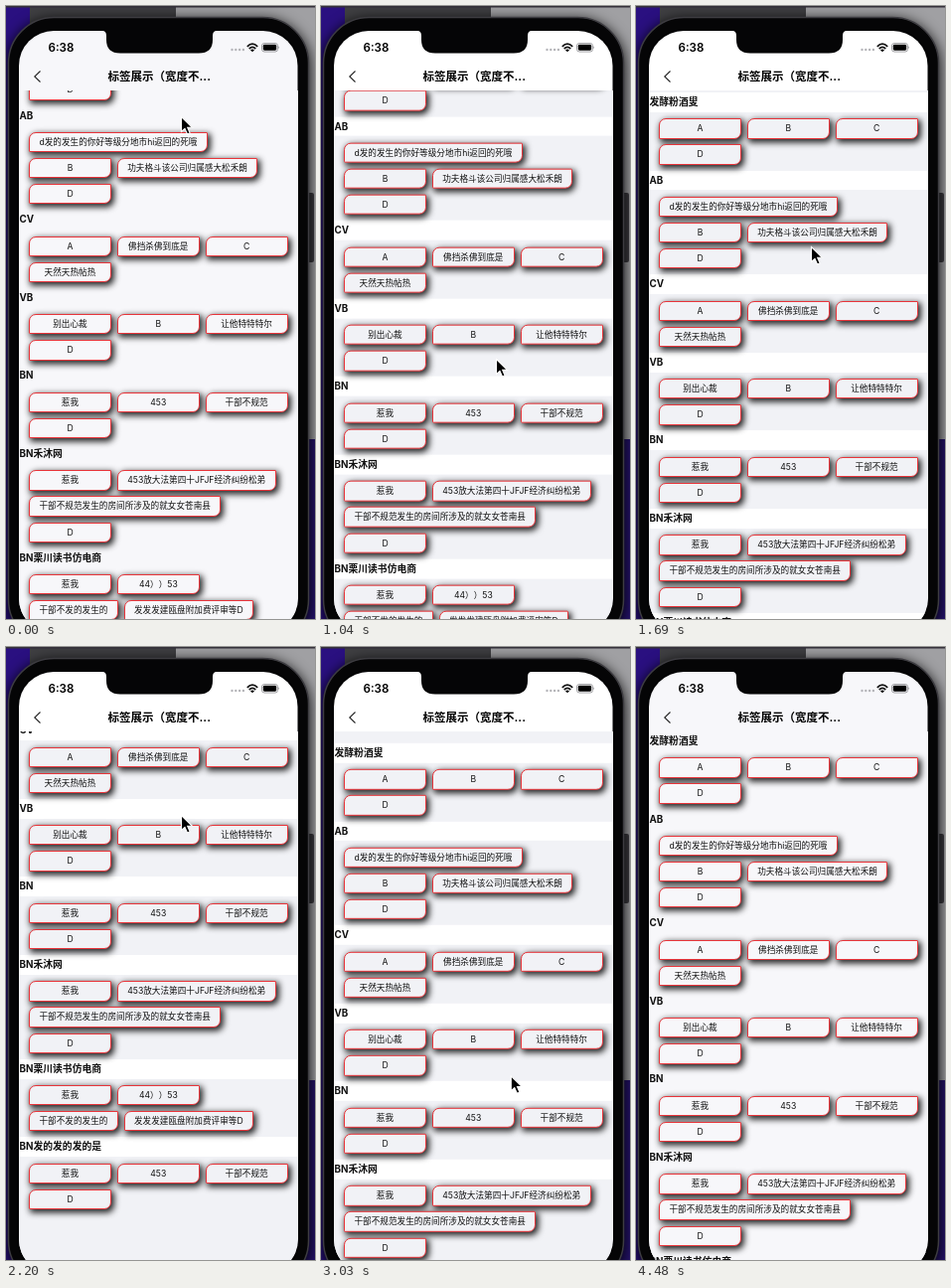
Animation, 311 px wide and 617 px high, one loop 4.58 s. Source, as an HTML page:

```html
<!DOCTYPE html>
<html lang="zh-CN">
<head>
<meta charset="utf-8">
<title>标签展示</title>
<style>
  html, body { margin: 0; width: 100%; height: 100%; overflow: hidden; }
  body {
    position: relative; background: #17151c; color: #111;
    font-family: Inter, "Noto Sans CJK SC", "Noto Sans CJK", sans-serif;
    text-spacing-trim: space-all;
    --section: #f1f2f6; --header: #fff;
  }
  body.flat { --section: #f7f7fa; --header: #f7f7fa; }
  #phone, #cursor { position: absolute; left: 0; top: 0; }
  #case { filter: drop-shadow(0 3px 7px #000); }
  #list {
    position: absolute; left: 13px; top: 85px; width: 280.5px; height: 546px;
    overflow: hidden; border-radius: 0 0 35px 35px; background: var(--section);
  }
  h2 {
    margin: 0 0 6.5px; height: 19.8px; padding-left: .5px;
    font-size: 9.8px; line-height: 19.8px; background: var(--header);
  }
  .row { display: flex; gap: 5.8px; height: 26.15px; padding-left: 10px; }
  .chip {
    box-sizing: border-box; min-width: 83px; height: 20.3px; padding: 0 9.4px;
    border: 1px solid #e8343a; border-radius: 7px 1px 7px 1px;
    background: var(--section); box-shadow: 2px 2.5px 6px 1px rgba(0, 0, 0, .85);
    font-size: 8.65px; line-height: 18.3px; text-align: center; white-space: nowrap;
  }
  #tooltip {
    position: absolute; left: 225px; top: 604px; width: 87px; height: 24px;
    border-radius: 4px 0 0 0; background: #dad7dd;
    font-size: 13.8px; line-height: 24px; text-align: center;
  }
</style>
</head>
<body>
<svg id="phone" width="311" height="617">
  <path fill="#2a1080" d="M0 0H24V617H0Z"/>
  <path fill="#3f3f42" d="M24 0H171V60H24Z"/>
  <path fill="#a0a0a3" d="M171 0H311V436H171Z"/>
  <path fill="#24126a" d="M250 436H311V617H250Z"/>
  <path fill="#35313a" d="M0 0H311V1.5H0Z"/>
  <rect x="303" y="188" width="7" height="70" rx="2" fill="#3b3a3f"/>
  <rect id="case" x="2.5" y="11.5" width="302" height="632" rx="46" fill="#050506" stroke="#3d3c41" stroke-width="1.5"/>
  <rect x="13" y="25" width="280.5" height="606" rx="35" style="fill:var(--header)"/>
  <path d="M97 25Q101 25 101 30V34Q101 47.5 115 47.5H194Q208 47.5 208 34V30Q208 25 212 25Z" fill="#050506"/>
  <text x="42.5" y="45.5" font-size="11.6" font-weight="600">6:38</text>
  <g fill="#b5b5b9">
    <circle cx="227.5" cy="44" r="1.2"/><circle cx="231.3" cy="44" r="1.2"/>
    <circle cx="235.1" cy="44" r="1.2"/><circle cx="238.9" cy="44" r="1.2"/>
  </g>
  <path d="M242.8 40.8Q248 35.6 253.2 40.8M244.8 43Q248 39.8 251.2 43" fill="none" stroke="#111" stroke-width="1.8"/>
  <path d="M246 44.3Q248 42.6 250 44.3L248 46.3Z"/>
  <rect x="257.5" y="37.5" width="16" height="8.5" rx="2.5" fill="none" stroke="#8c8c90" stroke-width=".8"/>
  <rect x="258.8" y="38.8" width="13.4" height="5.9" rx="1.4"/>
  <path d="M274.4 40.2Q276 41.7 274.4 43.3Z" fill="#8c8c90"/>
  <path d="M34.5 65.5L28.8 71L34.5 76.5" fill="none" stroke="#222" stroke-width="1.1"/>
  <text x="102.5" y="75" font-size="11.5" font-weight="bold">标签展示（宽度不...</text>
</svg>
<div id="list"><div id="content"></div></div>
<div id="tooltip">Simulator</div>
<svg id="cursor" width="14" height="20" overflow="visible">
  <path d="M0 0V15L3.5 11.8L6 17.5L8.6 16.4L6.2 10.8H11Z" stroke="#fff" stroke-width="1.1"/>
</svg>
<script>
const LOOP = 4580;
const REFRESH = 80;
const $ = id => document.getElementById(id);

// Title, then rows of tags.
const sections = [
  ["发酵粉酒叟", "A|B|C", "D"],
  ["AB", "d发的发生的你好等级分地市hi返回的死哦", "B|功夫格斗该公司归属感大松禾朗", "D"],
  ["CV", "A|佛挡杀佛到底是|C", "天然天热帖热"],
  ["VB", "别出心裁|B|让他特特特尔", "D"],
  ["BN", "惹我|453|干部不规范", "D"],
  ["BN禾沐网", "惹我|453放大法第四十JFJF经济纠纷松弟", "干部不规范发生的房间所涉及的就女女苍南县", "D"],
  ["BN栗川读书仿电商", "惹我|44））53", "干部不发的发生的|发发发建瓯盘附加费评审等D"],
  ["BN发的发的发的是", "惹我|453|干部不规范", "D"]
];
const chip = text => `<div class="chip">${text}</div>`;
const row = tags => `<div class="row">${tags.split("|").map(chip).join("")}</div>`;
$("content").innerHTML = sections
  .map(([title, ...rows]) => `<h2>${title}</h2>${rows.map(row).join("")}`)
  .join("");

const speedUp = u => u * u;
const settle = u => 1 - (1 - u) ** 3;
const smooth = u => u * u * (3 - 2 * u);

// Each move: arrival time, arrival position, easing on the way there.
const scroll = [
  [0, -63],
  [260, -202, settle],
  [640, -165, smooth],
  [1190, 48, speedUp],
  [1690, 2, settle],
  [2200, -194, smooth],
  [2770, 53, speedUp],
  [3380, 0, settle]
];
const pointer = [
  [0, 112],
  [630, 170, smooth],
  [1160, 384, smooth],
  [1690, 243, speedUp],
  [2000, 110, settle],
  [2200, 170, smooth],
  [2770, 363, smooth],
  [3250, 640, speedUp]
];

function position(moves, t) {
  const next = moves.findIndex(move => move[0] > t);
  if (next < 0) return moves.at(-1)[1];
  const [start, from] = moves[next - 1];
  const [end, to, ease] = moves[next];
  return from + (to - from) * ease((t - start) / (end - start));
}

// The screen refreshes at a fixed interval, counted from the start of each scroll move.
function refreshTime(t) {
  const start = scroll.findLast(move => move[0] <= t)[0];
  return t - (t - start) % REFRESH;
}

function draw() {
  const t = performance.now() % LOOP;
  const shown = refreshTime(t);
  const y = position(pointer, shown);
  const x = 176.5 + Math.max(0, y - 390) * .35;
  document.body.className = t < 50 || t >= 4480 ? "flat" : "";
  $("content").style.transform = `translateY(${position(scroll, shown)}px)`;
  $("cursor").style.transform = `translate(${x}px, ${y - .5}px)`;
  $("tooltip").style.opacity = t < 3300 ? 0 : Math.min(1, Math.max(0, (4270 - t) / 170));
  requestAnimationFrame(draw);
}
draw();
</script>
</body>
</html>
```
